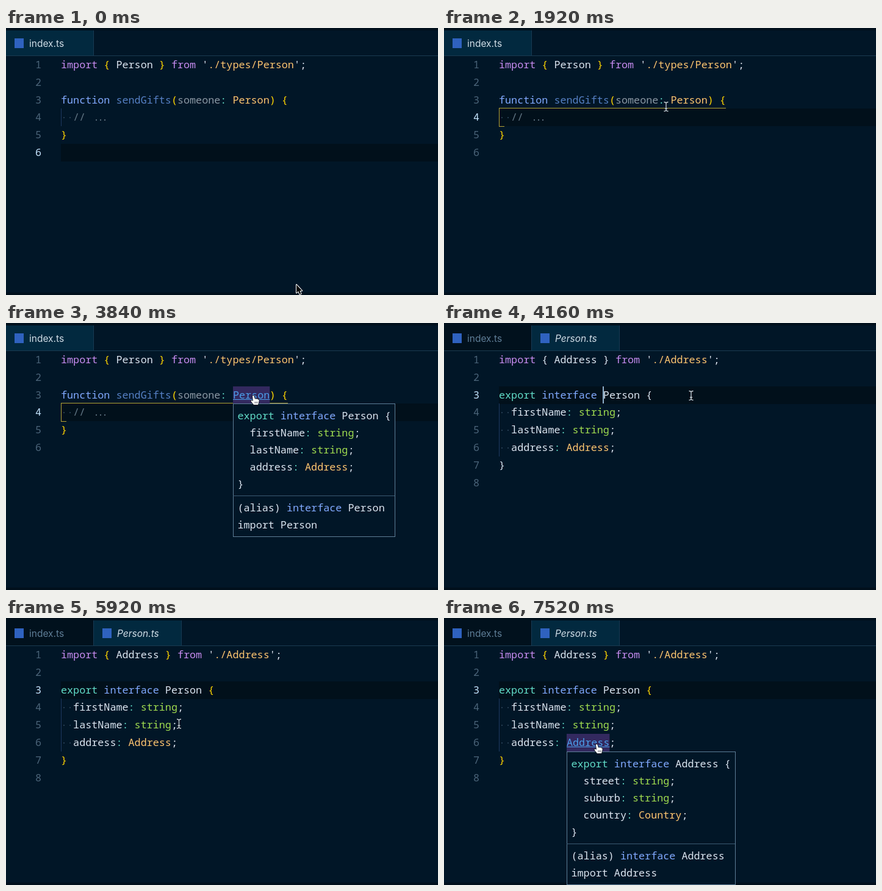
Recreate the animation shown at these times as an HTML page with a canvas. Size 708 px wide and 438 px high, loop 8 s.

```html
<!DOCTYPE html>
<html>
<head>
<meta charset="utf-8">
<style>
html, body { margin: 0; width: 100%; height: 100%; overflow: hidden; background: #011627 }
canvas { display: block }
</style>
</head>
<body>
<canvas id="stage" width="708" height="438"></canvas>
<script>
const ctx = document.getElementById('stage').getContext('2d');
const LOOP = 8000, STEP = 160, CHAR = 10.05, LEFT = 90;
const CLICK = 1340, OPEN = 4000, BRACKETS = 4480;
const CODE = '500 16.75px "Noto Sans Mono", monospace';

const colors = {
  p: '#c88cf0', y: '#ffd700', w: '#dde5f0', o: '#ffc570', b: '#82aaff',
  t: '#62dcc8', g: '#a0dc50', f: '#5680c4', d: '#8c98a4', l: '#4b9eea'
};

// Each run: one colour key, then its text
const indexFile = [
  "pimport |y{|w Person |y}|p from |w'|o./types/Person|w';",
  '',
  'bfunction |fsendGifts|y(|dsomeone|t: |oPerson|y) {',
  '',
  'y}',
  ''
];
const personBody = [
  'w  firstName|t: |gstring|w;',
  'w  lastName|t: |gstring|w;',
  'w  address|t: |oAddress|w;'
];
const personFile = [
  "pimport |y{|w Address |y}|p from |w'|o./Address|w';",
  '',
  'texport |binterface |wPerson |y{',
  ...personBody,
  'y}',
  ''
];
const alias = name => ['w(alias) |binterface |w' + name, 'wimport ' + name];
const personTip = ['texport |binterface |wPerson {', ...personBody, 'w}', ...alias('Person')];
const addressTip = [
  'texport |binterface |wAddress {',
  'w  street|t: |gstring|w;',
  'w  suburb|t: |gstring|w;',
  'w  country|t: |oCountry|w;',
  'w}',
  ...alias('Address')
];

const mouse = [
  [0, 475, 420], [160, 473, 410], [1120, 390, 215], [1440, 345, 150],
  [1920, 364, 129], [2400, 405, 119], [4800, 405, 119], [5120, 394, 73], [5280, 391, 68],
  [5440, 378, 82], [6080, 252, 204], [6240, 245, 207], [6560, 245, 207], [7040, 250, 207]
];

const lineTop = n => Math.floor(46.4 + (n - 1) * 28.8);

function rect(x, y, w, h, color) {
  ctx.fillStyle = color;
  ctx.fillRect(x, y, w, h);
}

function text(s, x, y, color, font = CODE) {
  ctx.font = font;
  ctx.fillStyle = color;
  ctx.fillText(s, x, y);
}

function runs(line, x, y, plainBrackets) {
  if (!line) return;
  for (const run of line.split('|')) {
    const key = plainBrackets && run[0] === 'y' ? 'w' : run[0];
    text(run.slice(1), x, y, colors[key]);
    x += (run.length - 1) * CHAR;
  }
}

function tab(x, name, active, style = '') {
  rect(x, 4, 144, 41, active ? '#02293f' : '#01111d');
  rect(x + 143, 4, 1, 41, '#173a54');
  rect(x + 14, 17, 15, 16, '#2f62bf');
  text(name, x + 38, 31, active ? '#d2dee7' : '#5f7e97', style + '15.5px Inter, sans-serif');
}

function indent(n) {
  for (const x of [94, 104]) rect(x, lineTop(n) + 14, 2, 2, '#243c50');
}

function caret(x, n, age) {
  if (age >= 0 && age % 1000 < 500) rect(x, lineTop(n), 2, 28, '#8fb0cc');
}

function editor(lines, active, plainBrackets) {
  rect(LEFT, lineTop(active), 618, 29, '#01101b');
  lines.forEach((line, i) => {
    const y = lineTop(i + 1) + 20;
    text(i + 1, 48, y, i + 1 === active ? '#c5e4fd' : '#4b6479');
    runs(line, LEFT, y, plainBrackets);
  });
}

function link(word, x, n) {
  const w = word.length * CHAR, y = lineTop(n);
  rect(x, y, w, 29, '#33295f');
  text(word, x, y + 20, colors.l);
  rect(x, y + 21, w, 1, colors.l);
}

function tooltip(lines, x, y, w, alpha = 1) {
  const full = lines.length > 2, h = full ? 218 : 67;
  ctx.globalAlpha = alpha;
  rect(x, y, w, h, '#011627');
  ctx.strokeStyle = '#5f7e97';
  ctx.lineWidth = 1;
  ctx.strokeRect(x + .5, y + .5, w, h);
  if (full) rect(x, y + 151, w, 1, '#3d5a72');
  lines.forEach((line, i) => runs(line, x + 7.5, y + 26 + i * 28 + (i > 4 ? 11 : 0)));
  ctx.globalAlpha = 1;
}

function shape(d, x, y, fill, stroke, width) {
  const path = new Path2D(d);
  ctx.save();
  ctx.translate(x, y);
  ctx.lineJoin = 'round';
  ctx.lineWidth = width;
  ctx.strokeStyle = stroke;
  ctx.stroke(path);
  if (fill) {
    ctx.fillStyle = fill;
    ctx.fill(path);
  }
  ctx.restore();
}

const pointers = {
  arrow(x, y) {
    shape('M1 1V14.5L4 11.8L6.3 16.8L8.6 15.8L6.4 10.9H10.2Z', x, y, '#0a0a0a', '#fff', 2);
  },
  beam(x, y) {
    const d = 'M-3.5 -7.5Q0 -7.5 0 -5V5Q0 7.5 -3.5 7.5M3.5 -7.5Q0 -7.5 0 -5V5Q0 7.5 3.5 7.5M-2 3H2';
    shape(d, x, y, null, '#01111d', 3);
    shape(d, x, y, null, '#c9d1d8', 1.3);
  },
  hand(x, y) {
    shape('M-1 1Q0 -1 1.5 1L3 6Q4.5 4.5 5.5 6Q7 5 8 6.5Q9.5 6 9.7 8L9 12L8 15H1L-3 10Q-4 8 -2 8L0 9Z',
      x, y, '#fff', '#101820', 1.6);
    shape('M3 10V13M5 10V13M7 10V13', x, y, null, '#445', .8);
  }
};

function mouseAt(t) {
  const i = mouse.findIndex(k => k[0] > t);
  if (i < 0) return mouse[mouse.length - 1].slice(1);
  const [t0, x0, y0] = mouse[i - 1], [t1, x1, y1] = mouse[i];
  const k = (t - t0) / (t1 - t0);
  return [x0 + (x1 - x0) * k, y0 + (y1 - y0) * k];
}

function indexView(t) {
  const clicked = t >= CLICK;
  tab(0, 'index.ts', true);
  editor(indexFile, clicked ? 4 : 6);
  indent(4);
  text('//', 110, lineTop(4) + 20, '#637785');
  for (const x of [143, 150, 157]) text('.', x, lineTop(4) + 20, '#637785');
  if (clicked) {
    const gold = '#b5a236';
    rect(LEFT, 131, 372, 1, gold);
    rect(LEFT, 131, 1, 31, gold);
    rect(LEFT, 161, 9, 1, gold);
    caret(170, 4, t - CLICK);
  } else {
    rect(LEFT, 132, 1, 29, '#1d3860');
    caret(LEFT, 6, t - 320);
  }
  if (t >= 2400) link('Person', 372, 3);
  if (t >= 2560) tooltip(personTip, 372, 132, 265, t < 2720 ? .85 : 1);
}

function personView(t) {
  tab(0, 'index.ts', false);
  tab(144, 'Person.ts', true, 'italic ');
  editor(personFile, 3, t < BRACKETS);
  rect(LEFT, 132, 1, 87, '#1d3860');
  [4, 5, 6].forEach(indent);
  caret(260, 3, t - OPEN);
  if (t >= 6240) link('Address', 201, 6);
  if (t >= 6880) tooltip(addressTip, 201, 219, 276);
  else if (t >= 6560) tooltip(alias('Address'), 201, 124, 266, t < 6720 ? .85 : 1);
}

function draw(now) {
  const t = Math.floor(now % LOOP / STEP) * STEP;
  rect(0, 0, 708, 438, '#011627');
  rect(0, 0, 708, 4, '#01101c');
  rect(0, 45, 708, 1, '#1a3a50');
  rect(0, 434, 708, 4, '#01101c');
  (t < OPEN ? indexView : personView)(t);
  const linking = t >= 2400 && t <= OPEN || t >= 6240;
  pointers[t < 160 ? 'arrow' : linking ? 'hand' : 'beam'](...mouseAt(t));
  requestAnimationFrame(draw);
}
requestAnimationFrame(draw);
</script>
</body>
</html>
```
